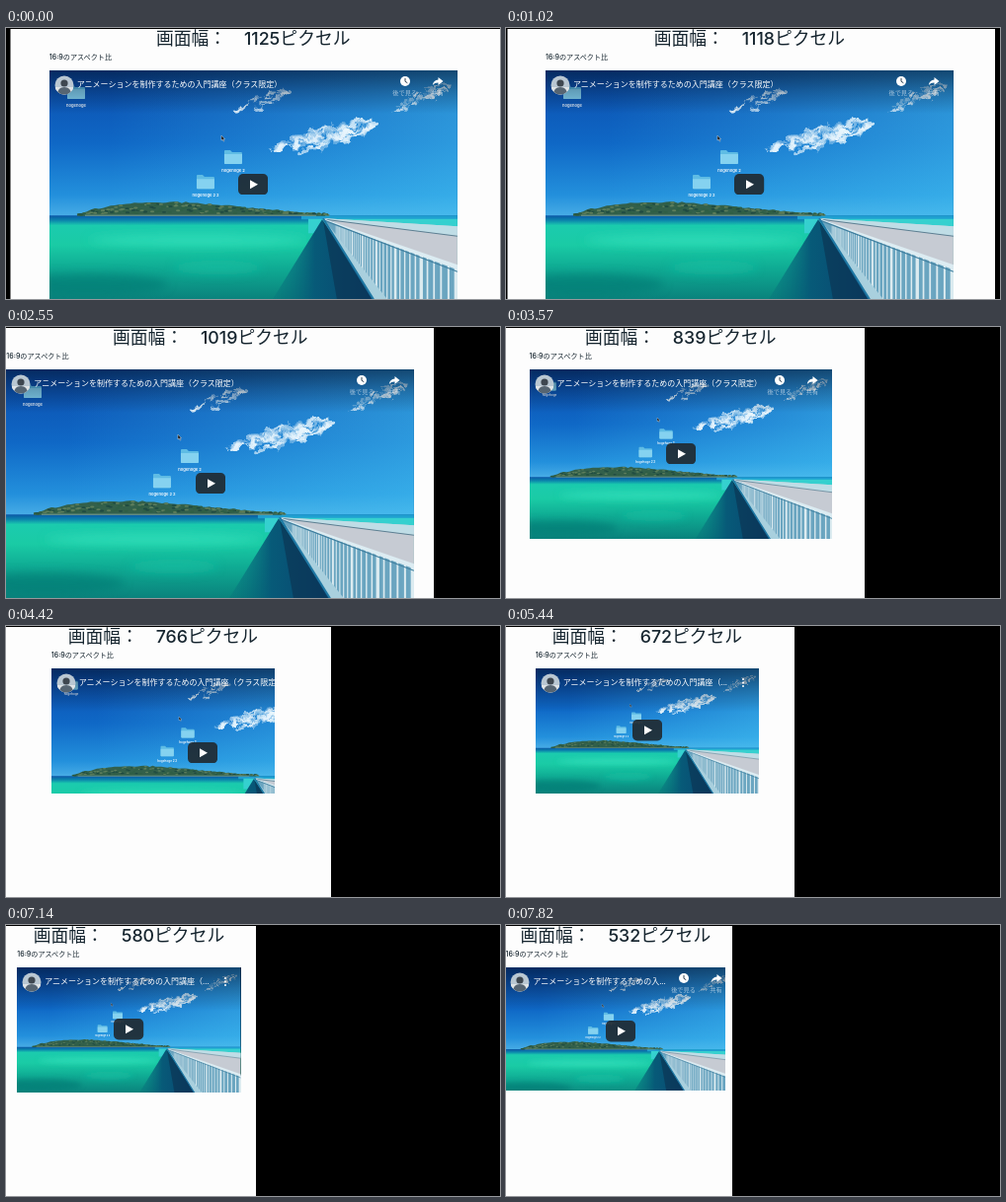
Write an HTML page that moves like this. It is 500 px wide and 275 px high and loops after 7.99 s.

```html
<!DOCTYPE html>
<html lang="ja">
<head>
<meta charset="utf-8">
<title>レスポンシブ動画</title>
<style>
html, body { margin: 0; width: 100%; height: 100%; overflow: hidden; background: #000; }
body { font-family: Inter, "Noto Sans CJK JP", "Noto Sans CJK", sans-serif; color: #16252f; }
#stage { position: absolute; left: 0; top: 0; width: 500px; height: 275px; overflow: hidden; background: #000; }
#page { position: absolute; top: 1px; height: 274px; background: #fdfdfd; box-shadow: inset 3.5px 0 #000; }
#stage div, #stage svg { position: absolute; }
.text { white-space: nowrap; }
#heading { left: 0; width: 100%; top: -1px; text-align: center; font-size: 17.8px; font-weight: 500; line-height: 22px; }
#ratio { top: 24px; font-size: 7.1px; font-weight: 500; line-height: 10px; }
#frame { top: 41.5px; overflow: hidden; background: #000; color: #fff; }
#player { left: 0; top: 0; overflow: hidden; }
#photo { left: 0; top: 0; width: 100%; height: 100%; }
#shade { left: 0; top: 0; width: 100%; height: 44px; background: linear-gradient(rgba(0,15,35,.55), rgba(0,15,35,.25) 50%, transparent); }
#avatar { left: 5px; top: 5px; }
#title { left: 28px; top: 8px; font: 8px/12px "Noto Sans CJK JP", "Noto Sans CJK", sans-serif; }
.action { width: 32px; top: 5px; height: 24px; text-align: center; }
.action svg { left: 10px; top: 0; }
.action .text { left: 0; width: 100%; top: 13px; font-size: 6.2px; line-height: 9px; opacity: .6; }
#later { right: 37px; }
#share { right: 4px; }
#more { right: 12px; top: 9px; }
#play { left: 50%; top: 50%; margin: -10.7px 0 0 -15.1px; }
</style>
</head>
<body>
<div id="stage">
  <div id="page">
    <div id="heading" class="text"></div>
    <div id="ratio" class="text">16:9のアスペクト比</div>
    <div id="frame">
      <div id="player">
        <svg id="photo" viewBox="0 0 413 232" preserveAspectRatio="none">
          <defs>
            <linearGradient id="sky" x2="0" y2="1">
              <stop stop-color="#0b4cab"/><stop offset=".5" stop-color="#0f68c6"/>
              <stop offset=".85" stop-color="#2390dc"/><stop offset="1" stop-color="#4aaee6"/>
            </linearGradient>
            <linearGradient id="glow">
              <stop offset=".15" stop-color="#45c3f2" stop-opacity="0"/><stop offset="1" stop-color="#45c3f2" stop-opacity=".55"/>
            </linearGradient>
            <linearGradient id="sea" x2="0" y2="1">
              <stop stop-color="#0b55a6"/><stop offset=".06" stop-color="#0b86ac"/><stop offset=".12" stop-color="#1bcbae"/>
              <stop offset=".35" stop-color="#1acba5"/><stop offset=".62" stop-color="#0fac94"/><stop offset="1" stop-color="#0a827c"/>
            </linearGradient>
            <linearGradient id="shadow">
              <stop stop-color="#08727c" stop-opacity=".3"/><stop offset=".4" stop-color="#075a78"/><stop offset="1" stop-color="#0a4270"/>
            </linearGradient>
            <filter id="fluffy" x="-20%" y="-50%" width="140%" height="200%">
              <feTurbulence type="fractalNoise" baseFrequency=".09" numOctaves="3" seed="4"/>
              <feDisplacementMap in="SourceGraphic" scale="14" xChannelSelector="R" yChannelSelector="G"/>
              <feGaussianBlur stdDeviation=".5"/>
            </filter>
            <filter id="wide" x="-20%" y="-80%" width="140%" height="260%"><feGaussianBlur stdDeviation="5"/></filter>
          </defs>
          <path fill="url(#sky)" d="M0 0H413V149H0z"/>
          <path fill="url(#glow)" d="M0 0H413V149H0z"/>
          <g id="clouds" fill="#e9f6fd" filter="url(#fluffy)"></g>
          <path fill="url(#sea)" d="M0 147H413V232H0z"/>
          <path fill="#1f9fd0" d="M255 147H413V151H255z"/>
          <path fill="#35d0cf" d="M262 150.500H413V165H262z"/>
          <g filter="url(#wide)">
            <ellipse cx="150" cy="172" rx="110" ry="6" fill="#35e0bd" opacity=".7"/>
            <ellipse cx="40" cy="217" rx="80" ry="11" fill="#087873" opacity=".6"/>
            <ellipse cx="170" cy="200" rx="45" ry="7" fill="#1fcaaa" opacity=".4"/>
          </g>
          <g id="island"></g>
          <path fill="url(#shadow)" d="M276 151L226 232H332z"/>
          <path fill="#0b2f4c" opacity=".55" d="M277 152L291 232H326z"/>
          <g id="bridge"></g>
          <g id="folders" fill="#fff" font-size="4.1" font-weight="600" text-anchor="middle"></g>
          <path d="M174 66v5l1.2-1 1 2 .8-.4-1-1.9h1.6z" fill="#111" stroke="#fff" stroke-width=".4"/>
        </svg>
        <div id="shade"></div>
        <svg id="avatar" width="20" height="20">
          <clipPath id="round"><circle cx="10" cy="10" r="9.5"/></clipPath>
          <g clip-path="url(#round)">
            <path fill="#b9c7d2" d="M0 0H20V20H0z"/><path fill="#e1e5e7" d="M0 12H20V20H0z"/>
            <circle cx="10" cy="8" r="3.6" fill="#3e4750"/><path fill="#566572" d="M3 20q0-8 7-8t7 8z"/>
          </g>
        </svg>
        <div id="title" class="text"></div>
        <div id="later" class="action">
          <svg width="12" height="12"><circle cx="6" cy="6" r="5" fill="#fff"/><path d="M6 3v3.3l2.3 1.4" fill="none" stroke="#345" stroke-width="1"/></svg>
          <div class="text">後で見る</div>
        </div>
        <div id="share" class="action">
          <svg width="12" height="12"><path d="M6.5 2L11.5 6 6.5 10V7.6Q3 7.5.8 10 1.5 5 6.5 4.5z" fill="#fff"/></svg>
          <div class="text">共有</div>
        </div>
        <svg id="more" width="8" height="12" fill="#fff"><circle cx="4" cy="2" r="1"/><circle cx="4" cy="5.5" r="1"/><circle cx="4" cy="9" r="1"/></svg>
        <svg id="play" width="30.2" height="21.4"><rect width="30.2" height="21.4" rx="5" fill="#20282e" fill-opacity=".9"/><path d="M12 6.2L20 10.7 12 15.2z" fill="#fff"/></svg>
      </div>
    </div>
  </div>
</div>
<script>
const $ = id => document.getElementById(id);
const STEP = 170, STEPS = 47, SCALE = 0.444;
const TITLE = 'アニメーションを制作するための入門講座（クラス限定）';

// step, viewport width in page pixels, right edge on the stage
const KEYS = [
  [0, 1125, 500], [5, 1125, 500], [10, 1088, 473], [12, 1060, 462], [15, 1019, 433],
  [19, 899, 384], [21, 839, 363], [26, 766, 329], [33, 656, 286], [37, 594, 261],
  [39, 588, 258], [41, 588, 258], [45, 555, 239], [46, 532, 229]
];

let seed = 7;
const random = () => (seed = seed * 16807 % 2147483647) / 2147483647;
const lerp = (a, b, u) => a + (b - a) * u;

function cloud(x1, y1, x2, y2, count, size) {
  let out = '';
  for (let i = 0; i < count; i++) {
    const u = random(), spread = size * (0.3 + Math.sin(u * Math.PI));
    const x = lerp(x1, x2, u), y = lerp(y1, y2, u) + (random() - 0.5) * spread;
    out += `<ellipse cx="${x}" cy="${y}" rx="${size * (0.15 + random() * 0.35)}" ry="${size * (0.05 + random() * 0.12)}" opacity="${0.25 + random() * 0.45}" transform="rotate(-18 ${x} ${y})"/>`;
  }
  return out;
}

// The ridge rises quickly on the left and falls off slowly to the right
function island() {
  let ridge = 'M28 146', trees = '';
  for (let x = 30; x <= 278; x += 4) {
    const u = (x - 28) / 252;
    const top = 146 - 13 * Math.min(1, Math.pow(u * 4, 0.6), Math.pow((1 - u) * 1.8, 0.9)) + random() * 1.5;
    ridge += `L${x} ${top}`;
    for (let i = 0; i < 3; i++) {
      const color = ['#1f4a42', '#5c7d5c', '#2f5f45'][Math.floor(random() * 3)];
      trees += `<ellipse cx="${x + random() * 4}" cy="${lerp(top + 1, 145, random())}" rx="2.2" ry=".9" fill="${color}"/>`;
    }
  }
  return `<path d="${ridge}L280 147.500H28z" fill="#33604b"/>${trees}<path d="M36 147H270" stroke="#8fb0a2" stroke-width=".8"/>`;
}

function bridge() {
  let posts = '';
  for (let i = 0; i < 40; i++) {
    const x = 278 + 134 * Math.pow(0.94, i), top = 150 + (x - 278) * 0.37;
    const base = Math.min(232, 150 + (x - 278) * 1.4);
    posts += `<path d="M${x} ${top}V${base}" stroke-width="${0.3 + (x - 278) / (i % 5 ? 75 : 32)}"/>`;
  }
  return `<path d="M279 150L413 158V203L279 152z" fill="#c6cbd3"/>
    <path d="M279 150L413 158V168L279 151z" fill="#bfdde6"/>
    <path d="M279 151L413 168" stroke="#5d7f92" stroke-width="1"/>
    <path d="M278 150L413 200V232H330z" fill="#6aa5c0"/>
    <g stroke="#dcebf0">${posts}</g>
    <path d="M277 150L413 197V202L278 152z" fill="#dcecf2"/>
    <path d="M278 152L413 204" stroke="#3f7f9f" stroke-width="1.2"/>
    <path d="M277 150L342 232H328z" fill="#a9d0de"/>
    <path d="M277 150L328 232" stroke="#1f78a4" stroke-width="2"/>`;
}

const folder = (x, y, name) => `<g transform="translate(${x} ${y})">
  <path d="M-9-6q0-1 1-1h5l2 2h9q1 0 1 1V6q0 1-1 1H-8q-1 0-1-1z" fill="#5fbce4"/>
  <path d="M-9-3H9V6q0 1-1 1H-8q-1 0-1-1z" fill="#85d2f0"/>
  <text y="14.5">${name}</text></g>`;

$('clouds').innerHTML = cloud(230, 78, 330, 54, 80, 17) + cloud(250, 70, 312, 58, 40, 12)
  + cloud(350, 40, 402, 16, 45, 11) + cloud(190, 42, 243, 20, 45, 10);
$('island').innerHTML = island();
$('bridge').innerHTML = bridge();
$('folders').innerHTML = folder(27, 22, 'hogehoge') + folder(186, 88, 'hogehoge 2') + folder(158, 113, 'hogehoge 2 2');

function viewport(step) {
  const i = Math.max(1, KEYS.findIndex(key => key[0] >= step));
  const [a, b] = [KEYS[i - 1], KEYS[i]], u = (step - a[0]) / (b[0] - a[0]);
  return { width: Math.round(lerp(a[1], b[1], u)), right: lerp(a[2], b[2], u) };
}

// Content width of the responsive container
const contentWidth = width => SCALE * (width >= 992 ? 930 : width >= 768 ? 690 : width >= 576 ? 510 : width - 30);

function setBox(el, width) {
  el.style.width = width + 'px';
  el.style.height = width * 9 / 16 + 'px';
}

function draw(step) {
  const { width, right } = viewport(step);
  const pageWidth = width * SCALE, outer = contentWidth(width);
  // The embedded player reflows one step after its container
  const inner = contentWidth(viewport(Math.max(0, step - 1)).width);
  const left = (pageWidth - outer) / 2 + 'px';
  $('page').style.left = right - pageWidth + 'px';
  $('page').style.width = pageWidth + 'px';
  $('heading').textContent = `画面幅：　${width}ピクセル`;
  $('ratio').style.left = $('frame').style.left = left;
  setBox($('frame'), outer);
  setBox($('player'), inner);

  const compact = inner < 229;
  $('later').style.display = $('share').style.display = compact ? 'none' : '';
  $('more').style.display = compact ? '' : 'none';
  const room = inner - 28 - (compact ? 30 : 69);
  $('title').textContent = room >= TITLE.length * 8 ? TITLE : TITLE.slice(0, Math.floor((room - 6) / 8)) + '...';
}

let shown = -1;
function tick() {
  const step = Math.floor(performance.now() / STEP) % STEPS;
  if (step !== shown) draw(shown = step);
  requestAnimationFrame(tick);
}
tick();
</script>
</body>
</html>
```
